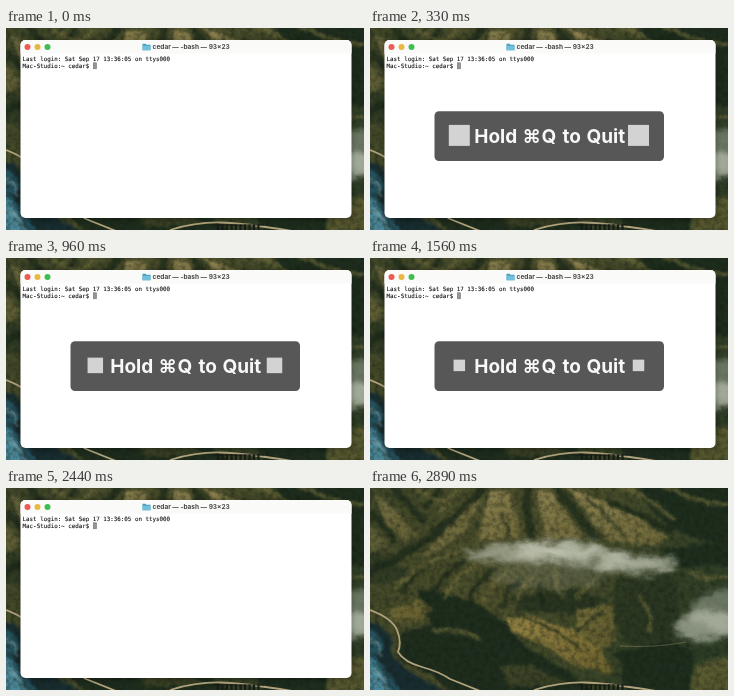
An HTML page that plays this animation: 358 px wide and 202 px high, repeating every 3850 ms.

```html
<!DOCTYPE html>
<html lang="en">
<head>
<meta charset="utf-8">
<title>Hold to quit</title>
<style>
html, body { margin: 0; width: 100%; height: 100%; overflow: hidden; background: #34371f; }
svg { display: block; width: 100%; height: 100%; }
text { white-space: pre; }
.mono { font: 5.83px "DejaVu Sans Mono", monospace; fill: #111; stroke: #111; stroke-width: .1; }
.title { font: 700 6.5px Inter, sans-serif; fill: #454545; }
.alert { font: 700 19px Inter, "Noto Sans", sans-serif; fill: #f8f8f8; }
</style>
</head>
<body>
<svg viewBox="0 0 358 202" preserveAspectRatio="none">
  <defs>
    <filter id="rough" filterUnits="userSpaceOnUse" x="-20" y="-20" width="398" height="242" color-interpolation-filters="sRGB">
      <feGaussianBlur stdDeviation="1.7" result="soft"/>
      <feTurbulence type="fractalNoise" baseFrequency=".07" numOctaves="3" seed="8" result="n"/>
      <feDisplacementMap in="soft" in2="n" scale="7" xChannelSelector="R" yChannelSelector="G"/>
    </filter>
    <filter id="grain" filterUnits="userSpaceOnUse" x="0" y="0" width="358" height="202" color-interpolation-filters="sRGB">
      <feTurbulence type="fractalNoise" baseFrequency=".2" numOctaves="3" seed="3"/>
      <feColorMatrix values="0 0 0 0 .07  0 0 0 0 .1  0 0 0 0 .06  .9 0 0 0 -.33"/>
    </filter>
    <filter id="mist" filterUnits="userSpaceOnUse" x="40" y="20" width="380" height="180" color-interpolation-filters="sRGB">
      <feGaussianBlur stdDeviation="3.5" result="soft"/>
      <feTurbulence type="fractalNoise" baseFrequency=".05 .08" numOctaves="4" seed="5" result="n"/>
      <feDisplacementMap in="soft" in2="n" scale="15" xChannelSelector="R" yChannelSelector="G"/>
    </filter>
    <filter id="drop" x="-10%" y="-10%" width="120%" height="130%">
      <feGaussianBlur stdDeviation="3"/>
    </filter>
    <linearGradient id="ground" x1="0" y1="0" x2="1" y2=".35">
      <stop offset="0" stop-color="#3c4427"/><stop offset=".5" stop-color="#4d4f2b"/><stop offset="1" stop-color="#2d3d25"/>
    </linearGradient>
    <linearGradient id="tan" x1="0" y1="0" x2="1" y2="1">
      <stop offset="0" stop-color="#8d8250"/><stop offset="1" stop-color="#6b6537"/>
    </linearGradient>
    <linearGradient id="gold" x1="0" y1="0" x2="1" y2="1">
      <stop offset="0" stop-color="#958444"/><stop offset="1" stop-color="#6a5f2c"/>
    </linearGradient>
  </defs>

  <g id="land">
    <g filter="url(#rough)">
      <path d="M-20-20H378V222H-20Z" fill="url(#ground)"/>
      <!-- valleys and wooded slopes -->
      <g fill="#1e2d1d">
        <path d="M262-20H378V58L330 52 300 40 276 14Z"/>
        <path d="M290 62 378 50V76L310 80Z"/>
        <path d="M46 100 100 112 132 132 158 160 200 184 222 202 212 222H104L62 188 30 172 30 146 60 136Z"/>
        <path d="M246 166 300 152 324 166 318 222H262Z"/>
        <path d="M-20 60 10 66 42 84 20 96-20 92Z" opacity=".45"/>
        <path d="M246 92 304 86 312 148 262 158 242 130Z" opacity=".5"/>
        <path d="M140 106 206 102 236 112 206 126 150 124Z" opacity=".7"/>
      </g>
      <!-- sunlit faces -->
      <g fill="url(#tan)">
        <path d="M120 2 140 4 150 50 108 52Z"/>
        <path d="M166 0 182 4 214 50 176 50Z"/>
        <path d="M196 0 222 8 252 20 298 50 284 58 240 54Z"/>
        <path d="M104 8 112 14 88 50 52 70Z" opacity=".8"/>
        <path d="M4 6 18 14 36 34 48 46 34 54 16 36Z" opacity=".7"/>
        <path d="M-8 34 8 44 18 60-8 68Z" opacity=".5"/>
      </g>
      <g fill="url(#gold)">
        <path d="M134 130 164 128 204 142 232 160 242 186 206 178 168 154 140 142Z"/>
        <path d="M206 122 242 116 246 154 232 160 206 142Z" opacity=".65"/>
        <path d="M326 176 378 164V222H318Z" opacity=".5"/>
        <path d="M18 122 50 112 64 122 40 136 20 132Z" opacity=".6"/>
        <path d="M128 178 160 176 200 196 140 200Z" opacity=".3"/>
      </g>
      <!-- gullies and crests -->
      <g fill="none" stroke="#1b291a" opacity=".75">
        <path d="M114-5Q92 30 50 56T-5 84M158-5Q154 28 164 52M186-2Q208 28 228 52" stroke-width="8"/>
        <path d="M22-5Q34 18 58 34M0 24Q20 42 24 56M70-5Q66 10 54 20M236 14Q264 22 302 44" stroke-width="6"/>
        <path d="M96 70Q76 84 60 106M124 82Q104 94 100 114M150 92Q132 104 134 122M172 94Q166 106 176 118M60 76Q40 88 30 104" stroke-width="5"/>
        <path d="M148 128Q188 138 210 162M206 142Q222 136 232 122M130 24Q138 36 140 52M216 10Q240 30 256 52" stroke-width="2.5"/>
      </g>
      <g fill="none" stroke="#716d3c" stroke-width="4" opacity=".7">
        <path d="M88 62Q54 74 24 100M108 74Q86 88 74 112M138 84Q118 96 114 116M164 90Q148 100 148 112M186 84Q182 100 194 108"/>
        <path d="M46 0Q60 12 78 14M88-2Q80 14 66 26M246-4Q280 8 304 32M290-5Q316 12 365 18"/>
        <path d="M226 92Q214 102 206 112M268 108Q282 120 280 144M318 84Q340 92 365 90M62 142Q92 140 112 152"/>
      </g>
      <!-- sea -->
      <path d="M-20 132 8 136 22 150 24 170 44 186 76 204V222H-20Z" fill="#182d31"/>
      <path d="M-20 138 8 144 14 158 6 168 16 184 30 200 26 222H-20Z" fill="#24505c"/>
      <path d="M-20 166 4 172 12 186 18 212H-20Z" fill="#4b8798"/>
      <path d="M-5 150 8 156 12 168M0 182 14 190 20 204" fill="none" stroke="#8eb0b5" stroke-width="1.500"/>
    </g>
    <rect width="358" height="202" filter="url(#grain)"/>
    <!-- roads and bridge -->
    <g fill="none" stroke="#b0a27c" stroke-width="1.8" stroke-linejoin="round">
      <path d="M0 122Q22 130 27 142T28 164Q34 174 52 179T80 191L110 203"/>
      <path d="M164 202Q190 194 214 194.500T286 203"/>
      <path d="M250 158Q286 160 316 154" stroke-width=".6" opacity=".6"/>
    </g>
    <path d="M207 197H258" stroke="#171b15" stroke-width="1.2"/>
    <path d="M211 199.500H256" stroke="#171b15" stroke-width="6" stroke-dasharray="2 2.500"/>
    <g filter="url(#mist)" fill="#c9cdbd">
      <ellipse cx="146" cy="66" rx="52" ry="9" opacity=".6"/>
      <ellipse cx="190" cy="61" rx="46" ry="9" opacity=".72"/>
      <ellipse cx="266" cy="76" rx="38" ry="9" opacity=".72"/>
      <ellipse cx="218" cy="69" rx="44" ry="8" opacity=".6"/>
      <ellipse cx="180" cy="88" rx="58" ry="14" opacity=".14"/>
      <ellipse cx="336" cy="138" rx="32" ry="15" opacity=".6"/>
      <ellipse cx="352" cy="122" rx="30" ry="20" opacity=".4"/>
    </g>
  </g>

  <g id="win">
    <rect x="14.500" y="13" width="331" height="178" rx="5" opacity=".35" filter="url(#drop)"/>
    <rect x="14.500" y="12" width="331" height="178" rx="5" fill="#fff"/>
    <path d="M14.500 25.500V17a5 5 0 0 1 5-5H340.500a5 5 0 0 1 5 5V25.500Z" fill="#fafaf9"/>
    <circle cx="21.500" cy="19" r="3" fill="#ec5b54"/>
    <circle cx="31.500" cy="19" r="3" fill="#eab840"/>
    <circle cx="41.500" cy="19" r="3" fill="#3fbe50"/>
    <path d="M136.500 15.800h3l1 1h4v5.400h-8Z" fill="#4a9fc0"/>
    <path d="M136.500 17.800h8v4.400h-8Z" fill="#72c0dc"/>
    <text class="title" x="146.600" y="21.400">cedar — -bash — 93×23</text>
    <text class="mono" x="16.600" y="32.500">Last login: Sat Sep 17 13:36:05 on ttys000</text>
    <text class="mono" x="16.600" y="39.500">Mac-Studio:~ cedar$ </text>
    <rect x="87.300" y="34.800" width="3.200" height="6" fill="#949494" stroke="#777" stroke-width=".6"/>
  </g>

  <g id="alert">
    <rect x="64.500" y="83.300" width="229.500" height="49.700" rx="4.500" fill="#000" fill-opacity=".66"/>
    <text class="alert" y="114.600"><tspan x="104.200">Hold</tspan> <tspan x="152.600">⌘</tspan><tspan x="171.400">Q</tspan> <tspan x="192.600">to</tspan> <tspan x="216.400">Quit</tspan></text>
    <rect class="box" fill="#d3d3d3"/>
    <rect class="box" fill="#d3d3d3"/>
  </g>
</svg>
<script>
const LOOP = 3850, CLOSE = 2540;
const win = document.getElementById("win");
const alertBox = document.getElementById("alert");
const boxes = document.querySelectorAll(".box");
const centers = [89.3, 268.5], midY = 107.4;
// start time and side length of the countdown squares
const sizes = [[0, 21], [670, 18], [960, 15.5], [1230, 13], [1560, 11.5], [1850, 10]];

function fade(t) {
  if (t >= 2440) return 0;
  if (t >= 2410) return .4;
  return Math.min(1, Math.max(0, (t - 20) / 200));
}

function render(t) {
  const size = sizes.filter(s => s[0] <= t).pop()[1];
  boxes.forEach((box, i) => {
    box.setAttribute("x", centers[i] - size / 2);
    box.setAttribute("y", midY - size / 2);
    box.setAttribute("width", size);
    box.setAttribute("height", size);
  });
  alertBox.setAttribute("opacity", fade(t));
  win.setAttribute("visibility", t < CLOSE ? "visible" : "hidden");
}

const start = performance.now();
function tick() {
  render((performance.now() - start) % LOOP);
  requestAnimationFrame(tick);
}
render(0);
requestAnimationFrame(tick);
</script>
</body>
</html>
```
